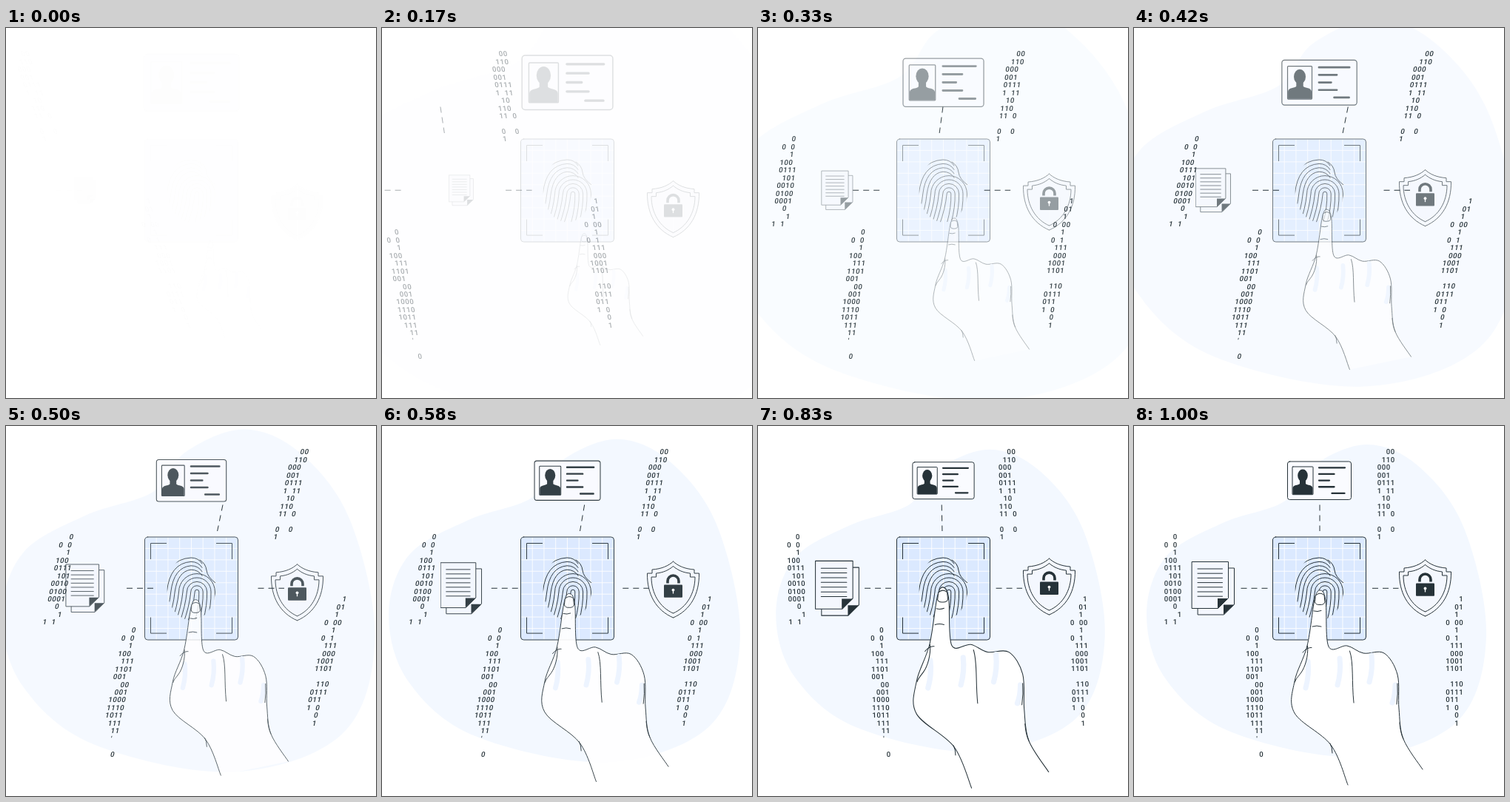
An HTML page that plays this animation: 500x500 px, repeating every 1.04 s.

```html
<!DOCTYPE html>
<html lang="en">
<head>
<meta charset="utf-8">
<title>Fingerprint access</title>
<style>
html, body { margin: 0; width: 100%; height: 100%; overflow: hidden; background: #fff; }
svg { display: block; width: 100%; height: 100%; }
.line { fill: none; stroke: #263238; stroke-width: 1; stroke-linecap: round; stroke-linejoin: round; }
.flat { stroke-linecap: butt; }
.dark { fill: #263238; }
.paper { fill: #f4f7fe; }
text { font: 500 9.6px Roboto, "Noto Sans", sans-serif; font-stretch: 75%; fill: #263238; text-anchor: middle; }
</style>
</head>
<body>
<svg viewBox="0 0 500 500">
  <clipPath id="pad"><ellipse cx="250.500" cy="219" rx="33" ry="43.500"/></clipPath>

  <g id="blob"><path id="blobShape" fill="#f3f8ff"/></g>

  <g id="device">
    <rect x="187.500" y="150" width="126" height="139" rx="4" fill="#dbe9ff"/>
    <path id="grid" fill="none" stroke="#fff" stroke-width=".9"/>
    <rect class="line" x="187.500" y="150" width="126" height="139" rx="4"/>
    <path id="corners" class="line flat"/>
    <path id="print" class="line" stroke-width="1.2" clip-path="url(#pad)"/>
  </g>

  <g id="card">
    <rect class="line" x="207.500" y="48" width="86" height="51.500" rx="3" style="fill:#fafbff"/>
    <rect class="line" x="214" y="55" width="28" height="37.700" rx=".8"/>
    <ellipse class="dark" cx="228" cy="67" rx="6.800" ry="8.500"/>
    <path class="dark" d="M224 72H232V78C234 80.500 241 79 241.500 84V92.500H214.500V84C215 79 222 80.500 224 78Z"/>
    <path id="details" class="line" style="stroke-width:2.300"/>
  </g>

  <g id="docs">
    <g id="sheet">
      <path class="line paper" style="fill:#f4f7fe" d="M78.500 183.500H127.500V232.500L113.500 246.500H78.500Z"/>
      <path class="dark" d="M113 233H127.500L113 246.500Z"/>
    </g>
    <path id="rules" class="line"/>
  </g>

  <g id="shield">
    <g id="half">
      <path class="paper" d="M393.500 181C387 187 378 191 365 192V197H358.500C358 225 370 247 393.500 257Z"/>
      <path class="line" d="M393.500 181C387 187 378 191 365 192V197H358.500C358 225 370 247 393.500 257M393.500 187.500C387 193 380 196 370.500 197V202H364C364 224 375 243 393.500 251"/>
    </g>
    <use href="#half" transform="matrix(-1 0 0 1 787 0)"/>
    <path class="line flat" style="stroke-width:3.600" d="M386 210.500V207.500A7.500 7.500 0 0 1 401 207.500V210.500"/>
    <rect class="dark" x="381" y="212.500" width="25" height="17.300" rx="1"/>
    <circle cx="393.500" cy="219.500" r="1.900" fill="#fff"/>
    <path d="M393.500 220V224.500" stroke="#fff" stroke-width="1.300"/>
  </g>

  <g id="hand">
    <path id="palm" class="line" style="fill:#fff"/>
    <path id="shades" stroke="#edf4ff" stroke-width="7" stroke-linecap="round" fill="none"/>
    <path class="line" d="M234.500 297C236 311 231 326 226 333S219 341 217.500 346M228 306C232 301 237 299 240 299.500M291.500 304C297 320 294 345 297 374M356 348Q357 362 355 376M265 429Q268 434 268 442M359 401Q360 415 364 423M243 250Q248 251.500 253 249.500M241 271Q247 269 253 271"/>
    <path class="line" style="fill:#fff" d="M245.500 229Q251 223.500 257 228.500L258 238Q256.500 242 251 241.500Q245.500 242 244.500 238Z"/>
  </g>

  <g id="dashes" class="line flat" stroke-dasharray="8 6">
    <path d="M144.500 219.300H181M322 219.300H357.500M251 106.500V142"/>
  </g>
  <g id="codes"></g>
</svg>

<script>
const el = id => document.getElementById(id);
const path = (id, d) => el(id).setAttribute('d', d);
const repeat = (n, fn) => Array.from({ length: n }, (_, i) => fn(i)).join('');

// Smooth curve through a few key points (Catmull-Rom).
function curve(str, closed) {
  const p = str.split(' ').map(s => s.split(',').map(Number));
  const n = p.length;
  const at = i => closed ? p[(i + n) % n] : p[Math.max(0, Math.min(n - 1, i))];
  return `M${p[0]}` + repeat(closed ? n : n - 1, i => {
    const [a, b, c, e] = [at(i - 1), at(i), at(i + 1), at(i + 2)];
    const c1 = b.map((v, k) => v + (c[k] - a[k]) / 6);
    const c2 = c.map((v, k) => v - (e[k] - b[k]) / 6);
    return `C${c1} ${c2} ${c}`;
  });
}

path('blobShape', curve('17,255 43,177 120,131 203,102 243,53 315,25 384,54 446,138 476,285 435,401 300,447 130,413 43,342', true));
path('palm', curve('289,485 266,431 217,388 217,345 234,297 244,235 251.5,222 259,236 263,298 ' +
  '288,297 310,307 338,307 356,336 358,382 364,423 390,464'));
path('shades', repeat(3, i => `M${235 + i * 43} ${318 - i * 4}q2 18 -3 36`) + 'M353 350q0 14 -4 24');

path('grid', repeat(7, i => `M${203.2 + i * 15.75} 150.5V288.5`) + repeat(8, i => `M188 ${165.4 + i * 15.45}H313`));
path('corners', repeat(4, i => {
  const sx = i % 2 ? 1 : -1, sy = i < 2 ? -1 : 1;
  return `M${250.5 + sx * 55} ${219.3 + sy * 39.3}v${sy * 21.5}h${-sx * 21.5}`;
}));
path('rules', repeat(7, i => `M86 ${193 + i * 6.2}H119.5`));
path('details', [35, 20.5, 14, 20.5, 17].map((w, i) => `M${i < 4 ? 250 : 267.5} ${56.3 + i * 8.65}h${w}`).join(''));

const back = el('sheet').cloneNode(true);
back.removeAttribute('id');
back.setAttribute('transform', 'translate(8 8.5)');
el('docs').prepend(back);

// Loops whose left legs lean out; the outer ones end in a short tail on the right.
path('print', repeat(9, k => {
  const r = 2.8 + k * 5.4, cx = 258, cy = 224;
  const left = `M${cx - 10 - r} ${cy + 42}Q${cx - 2 - r} ${cy + 20} ${cx - r} ${cy}`;
  return k < 5
    ? `${left}A${r} ${r} 0 0 1 ${cx + r} ${cy}q.5 18 -5 38`
    : `${left}Q${cx - r + 4} ${cy - r + 2} ${cx - 8} ${cy - r}q10 0 15 8`;
}) + 'M262 181Q270 186 271 195T283 212');

// Blocks of digits: left column, first row, rows of text.
const blocks = [
  [331.5, 35, '  00/ 110/000/001/0111/1 11/ 10/110/11 0//0  0/1'],
  [43.5, 150, '  0/0 0/  1/100/0111/ 101/0010/0100/0001/  0/   1/1 1'],
  [154, 276, '  0/0 0/  1/100/ 111/1101/001/  00/ 001/1000/1110/1011/ 111/  11/  \'//   0'],
  [424, 234, '   1/  01/  1/0 00/  1/0 1/ 111/ 000/1001/1101// 110/0111/011/1 0/  0/  1']
];
el('codes').innerHTML = blocks.map(([x, y, rows]) => rows.split('/').map((row, r) => {
  const xs = [...row].map((ch, c) => ch === ' ' ? '' : x + c * 6).filter(String);
  return `<text x="${xs.join(' ')}" y="${y + r * 10.45 + 3.4}">${row.replace(/ /g, '')}</text>`;
}).join('')).join('');

// cubic-bezier(.36, -.01, .5, 1.38): overshoots, then settles.
const bez = (s, a, b) => 3 * (1 - s) ** 2 * s * a + 3 * (1 - s) * s * s * b + s ** 3;
function ease(x) {
  if (x <= 0) return 0;
  if (x >= 1) return 1;
  let lo = 0, hi = 1;
  for (let i = 0; i < 30; i++) {
    const mid = (lo + hi) / 2;
    if (bez(mid, 0.36, 0.5) < x) lo = mid; else hi = mid;
  }
  return bez(lo, -0.01, 1.38);
}

function pose(id, opacity, transform = '') {
  el(id).setAttribute('opacity', Math.max(0, Math.min(1, opacity)));
  el(id).setAttribute('transform', transform);
}

function zoom(id, p, from, cx, cy) {
  const s = from + (1 - from) * p;
  pose(id, p, `translate(${cx} ${cy}) scale(${s}) translate(${-cx} ${-cy})`);
}

const tan = deg => Math.tan(deg * Math.PI / 180);

// Slides in from the left, leaning one way, then the other, then upright.
function speedIn(id, t) {
  let p = 1, skew;
  if (t < 0.6) {
    p = ease(t / 0.6);
    skew = tan(20) + (tan(-10) - tan(20)) * p;
  } else if (t < 0.8) {
    skew = tan(-10 + 12 * ease((t - 0.6) / 0.2));
  } else {
    skew = tan(2) * (1 - ease((t - 0.8) / 0.2));
  }
  pose(id, p, `matrix(1 0 ${skew} 1 ${-250 * (1 - p) - 238.5 * skew} 0)`);
}

function draw(ms) {
  // Stepped at 24 pictures a second; the first one is held twice.
  let step = Math.floor((ms % 1040 + 5.1) * 0.024);
  if (step < 2) step = 0;
  const t = Math.min(1, step / 24 + 1 / 30);
  const p = ease(t);
  zoom('blob', p, 1.5, 246.5, 236);
  zoom('card', p, 1.5, 250.4, 73.8);
  zoom('docs', p, 0.5, 107.3, 219.3);
  zoom('hand', p, 0.5, 302.5, 352.5);
  pose('device', p);
  pose('shield', p, `translate(0 ${30 * (1 - p)})`);
  speedIn('dashes', t);
  speedIn('codes', t);
}

const start = performance.now();
function tick() {
  draw(performance.now() - start);
  requestAnimationFrame(tick);
}
tick();
</script>
</body>
</html>
```
